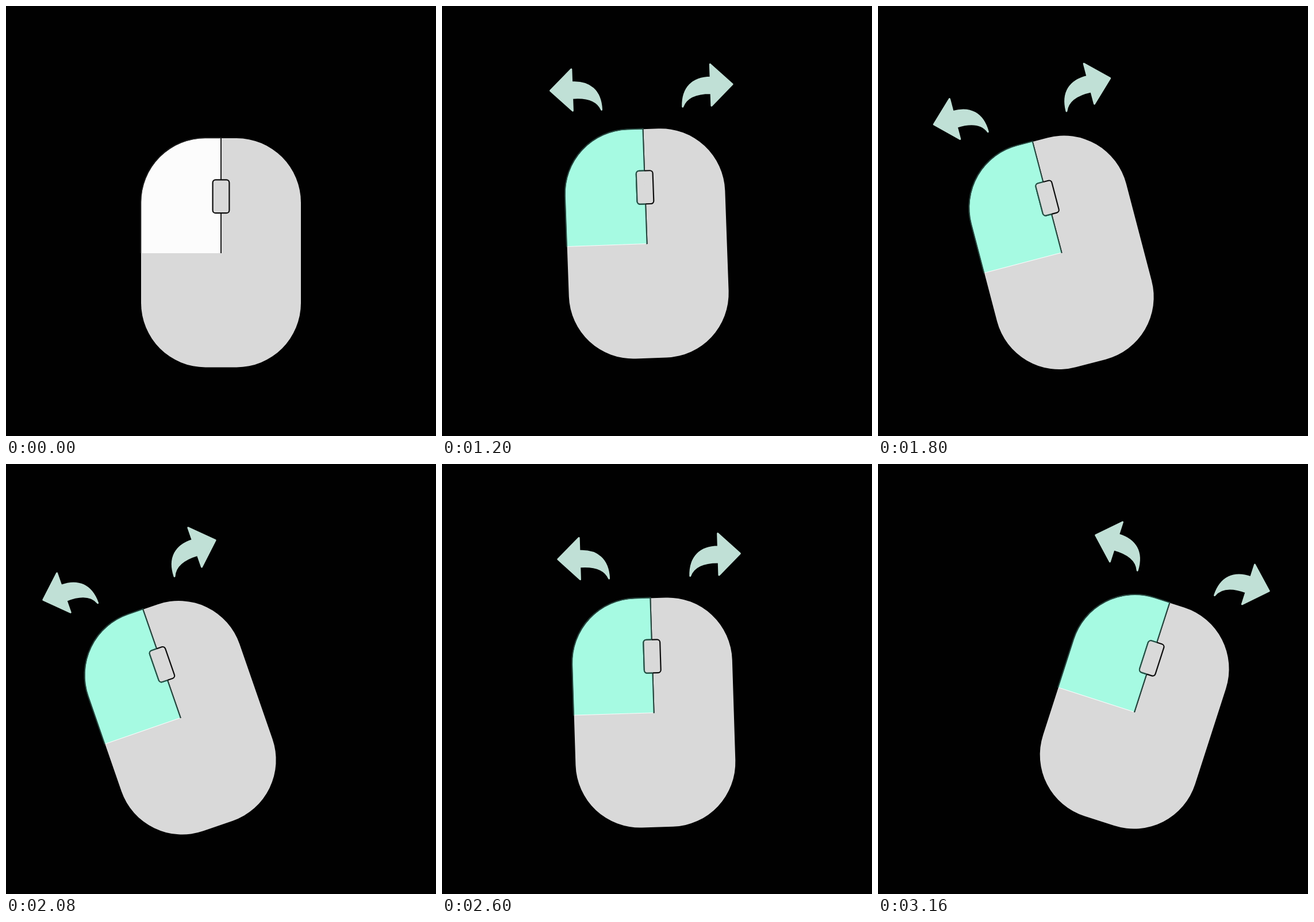
An HTML page with a canvas that plays this animation: 748 by 748 pixels, repeating every 3.48 s.

```html
<!DOCTYPE html>
<html lang="en">
<head>
<meta charset="utf-8">
<title>Mouse click and turn</title>
<style>
  html, body { margin: 0; width: 100%; height: 100%; overflow: hidden; background: #010101; }
  canvas { display: block; width: 748px; height: 748px; }
</style>
</head>
<body>
<canvas id="stage" width="748" height="748"></canvas>
<script>
const ctx = document.getElementById('stage').getContext('2d');
const SIZE = 748, LOOP = 3480, STEP = 40, MOVE_START = 600, MOVE_END = 3160;
const MID = { x: SIZE / 2, y: 430 };
const BODY = { left: 235, top: 230, width: 278, height: 398.5, radius: 112 };
const GREY = '#d9d9d9';

// Poses along the swing: n counts steps from MOVE_START
const poses = [
  { n: 0, x: 374, y: 430, angle: 0 },
  { n: 15, x: 356.6, y: 414.1, angle: -2.05 },
  { n: 20, x: 345, y: 408, angle: -6.2 },
  { n: 30, x: 319.6, y: 429.5, angle: -14.7 },
  { n: 36.5, x: 303.5, y: 442, angle: -19.2 },
  { n: 44, x: 338.9, y: 436.6, angle: -9.9 },
  { n: 56, x: 399.9, y: 431.4, angle: 6.55 },
  { n: 64, x: 445.9, y: 431.9, angle: 17.85 }
];

const secant = (i, prop) =>
  (poses[i + 1][prop] - poses[i][prop]) / (poses[i + 1].n - poses[i].n);

function slope(i, prop) {
  if (i === 0) return 0;
  const before = secant(i - 1, prop);
  if (i === poses.length - 1) return before;
  const after = secant(i, prop);
  return before * after <= 0 ? 0 : 2 * before * after / (before + after);
}

// Monotone cubic between neighbouring poses
function valueAt(n, prop) {
  const next = poses.findIndex((p, k) => k > 0 && n <= p.n), i = next - 1;
  const h = poses[next].n - poses[i].n;
  const u = (n - poses[i].n) / h, v = 1 - u;
  return v * v * (1 + 2 * u) * poses[i][prop] + u * u * (3 - 2 * u) * poses[next][prop]
    + h * u * v * (v * slope(i, prop) - u * slope(next, prop));
}

// Open path around the left button, from bottom left to the top middle
function buttonPath(bottom, grow = 0) {
  const left = BODY.left - grow, top = BODY.top - grow, r = BODY.radius;
  ctx.beginPath();
  ctx.moveTo(left, bottom);
  ctx.lineTo(left, top + r);
  ctx.arc(left + r, top + r, r, Math.PI, Math.PI * 1.5);
  ctx.lineTo(MID.x, top);
}

function button(fill, edge, bottom) {
  buttonPath(bottom);
  ctx.lineTo(MID.x, bottom);
  ctx.fillStyle = fill;
  ctx.fill();
  buttonPath(MID.y, 0.7);
  ctx.lineTo(MID.x, MID.y);
  ctx.strokeStyle = edge;
  ctx.lineWidth = 2;
  ctx.stroke();
}

function wheel(edge) {
  ctx.beginPath();
  ctx.roundRect(359.6, 302.4, 28.8, 57.8, 5);
  ctx.fillStyle = GREY;
  ctx.strokeStyle = edge;
  ctx.lineWidth = 2.2;
  ctx.fill();
  ctx.stroke();
}

function arrow() {
  const neck = 253.2, end = 193.6;
  ctx.beginPath();
  ctx.moveTo(215.6, 157.4);
  ctx.lineTo(neck, 121.4);
  ctx.lineTo(neck, 144.2);
  ctx.bezierCurveTo(284, 143.5, 303, 160, 303.4, end);
  ctx.bezierCurveTo(297, 177.5, 281, 170.4, neck, 171.6);
  ctx.lineTo(neck, end);
  ctx.closePath();
  ctx.fillStyle = ctx.strokeStyle = '#c0e0d6';
  ctx.lineWidth = 3;
  ctx.lineJoin = 'round';
  ctx.fill();
  ctx.stroke();
}

function drawMouse(mix) {
  ctx.fillStyle = GREY;
  ctx.beginPath();
  ctx.roundRect(BODY.left, BODY.top, BODY.width, BODY.height, BODY.radius);
  ctx.fill();
  button('#fcfcfc', '#1c1c1c', MID.y);
  ctx.globalAlpha = mix;
  button('#a6fae2', '#24453d', MID.y - 1);
  ctx.globalAlpha = 1;
  wheel('#0c0c0c');

  // The mint tint also reaches the left half of the wheel edge
  ctx.save();
  ctx.beginPath();
  ctx.rect(0, 0, MID.x, SIZE);
  ctx.clip();
  ctx.globalAlpha = mix;
  wheel('#245347');
  ctx.restore();
}

function drawArrows(mix) {
  ctx.save();
  ctx.globalAlpha = mix;
  arrow();
  ctx.translate(SIZE, 0);
  ctx.scale(-1, 1);
  arrow();
  ctx.restore();
}

function draw(time) {
  const t = Math.floor(time % LOOP / STEP) * STEP;
  const n = (Math.min(MOVE_END, Math.max(MOVE_START, t)) - MOVE_START) / STEP;
  const mix = t < 400 ? 0 : t < 440 ? 0.5 : 1;
  ctx.fillStyle = '#010101';
  ctx.fillRect(0, 0, SIZE, SIZE);
  ctx.save();
  ctx.translate(valueAt(n, 'x'), valueAt(n, 'y'));
  ctx.rotate(valueAt(n, 'angle') * Math.PI / 180);
  ctx.translate(-MID.x, -MID.y);
  drawMouse(mix);
  drawArrows(mix);
  ctx.restore();
}

const start = performance.now();
function tick() {
  draw(performance.now() - start);
  requestAnimationFrame(tick);
}
tick();
</script>
</body>
</html>
```
